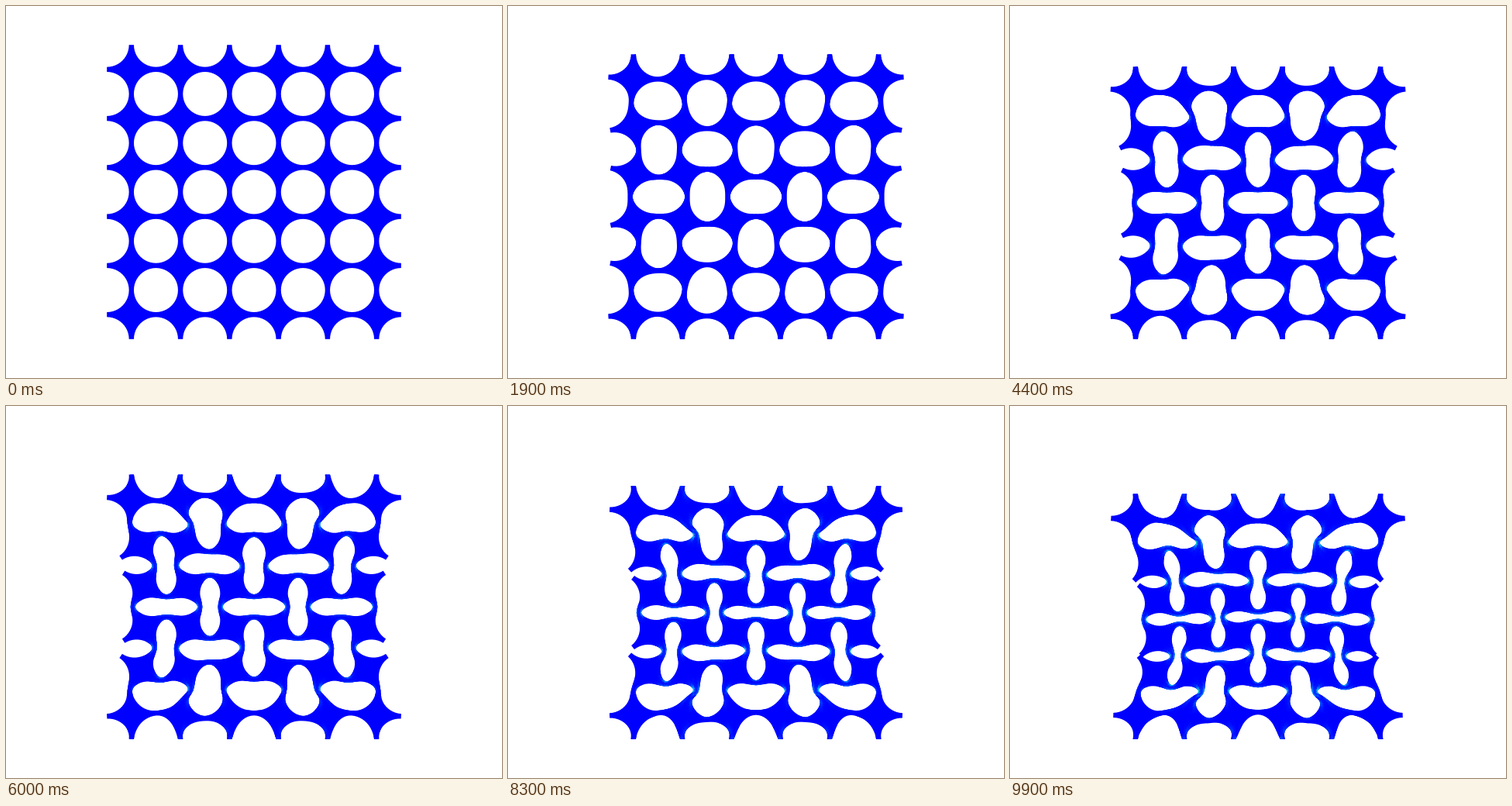
These frames come from a looping animation (640x480 px, 10000 ms). A matplotlib script:

```python
"""Compression of a perforated elastic sheet, solved with finite elements.

One quarter of the 6 x 6 cell sheet is modelled; the rest follows by mirroring.
"""
import numpy as np
import matplotlib.pyplot as plt
from matplotlib.animation import FuncAnimation
from matplotlib.colors import LinearSegmentedColormap
from matplotlib.patches import PathPatch
from matplotlib.path import Path
from matplotlib.tri import Triangulation

W, H, FRAMES = 640, 480, 100
CELL = 63.27            # cell size in pixels
RADIUS = 0.45           # hole radius in cells
SEGS = 3                # elements along each half arm
MU, LAM = 1.0, 1.5      # neo-Hookean constants
TORQUE = 6e-5           # tiny twist that picks the buckling pattern


# ---- mesh of one star-shaped cell ----
def arm_patch():
    s = np.linspace(0, 1, 2 * SEGS + 1)[:, None]
    r = np.linspace(0, 1, 3)
    phi = np.pi * (s - 3) / 4
    x = 0.5 + RADIUS * np.cos(phi)
    y = 0.5 + RADIUS * np.sin(phi)
    base = x - x[0] * (1 - s)
    return np.stack([base + (x - base) * r, y * r], -1)


def merge(points):
    flat = np.round(points.reshape(-1, 2), 6) + 0.0
    nodes, inv = np.unique(flat, axis=0, return_inverse=True)
    return nodes, inv.reshape(points.shape[:-1])


def cell_mesh():
    patch, images = arm_patch(), []
    for k in range(4):
        c, s = [(1, 0), (0, 1), (-1, 0), (0, -1)][k]
        for m in (-1, 1):
            x, y = patch[..., 0], m * patch[..., 1]
            images.append(np.stack([c * x - s * y, s * x + c * y], -1))
    nodes, ids = merge(np.array(images))
    elems = np.array([p[2 * e:2 * e + 3].ravel() for p in ids for e in range(SEGS)])
    loop = []
    for low, high in zip(ids[::2], ids[1::2]):
        loop += [*low[:, 2], low[-1, 1], low[-1, 0], high[-1, 1], *high[:0:-1, 2]]
    return nodes, elems, np.array(loop)


X, EL, LOOP = cell_mesh()
ND = 2 * len(X)
CENTRES = np.array([(i - 2.5, j + 0.5) for j in range(3) for i in range(3)])
NC = len(CENTRES)
XG, GID = merge(CENTRES[:, None] + X)
REF = XG[GID]

# ---- nine-node element operators at 3 x 3 Gauss points ----
gp = np.sqrt(0.6) * np.array([-1, 0, 1])
gw = np.array([5, 8, 5]) / 9
shape = np.stack([gp * (gp - 1) / 2, 1 - gp**2, gp * (gp + 1) / 2], 1)
slope = np.stack([gp - 0.5, -2 * gp, gp + 0.5], 1)
dn = np.stack([np.kron(slope, shape), np.kron(shape, slope)], -1)
jac = np.einsum('gap,eai->egpi', dn, X[EL])
GRAD = np.einsum('egip,gap->egai', np.linalg.inv(jac), dn)
VOL = np.abs(np.linalg.det(jac)) * np.outer(gw, gw).ravel()
NE = len(EL)
B = np.einsum('egaj,ik->egijak', GRAD, np.eye(2)).reshape(NE, 9, 4, 18)
BT = B.reshape(NE, 36, 18).transpose(0, 2, 1)

DOF = (2 * EL[:, :, None] + np.arange(2)).reshape(NE, 18)
cell_no = np.arange(NC)
F_IDX = (cell_no[:, None, None] * ND + DOF).ravel()
K_IDX = (cell_no[:, None, None, None] * ND**2
         + DOF[:, :, None] * ND + DOF[:, None, :]).ravel()
SHARE = np.bincount(EL.ravel(), minlength=len(X))


def dofs(nodes):
    return (2 * nodes[..., None] + np.arange(2)).reshape(*nodes.shape[:-1], -1)


on_port = np.abs(X).max(1) > 0.5 - 1e-5
PORT, INNER = dofs(np.flatnonzero(on_port)), dofs(np.flatnonzero(~on_port))
CELL_DOF = dofs(GID)
PORT_G, INNER_G = CELL_DOF[:, PORT], CELL_DOF[:, INNER]

fixed = np.stack([(XG[:, 0] > -1e-5) | (XG[:, 1] > 3 - 1e-5),
                  (XG[:, 1] < 1e-5) | (XG[:, 1] > 3 - 1e-5)], 1).ravel()
port_dofs = np.unique(PORT_G)
FREE = port_dofs[~fixed[port_dofs]]
PORT_POS = np.searchsorted(port_dofs, PORT_G)
FREE_POS = np.searchsorted(port_dofs, FREE)

spin = -(-1.0) ** (np.arange(NC) // 3 + np.arange(NC) % 3)
twist = np.stack([-X[:, 1], X[:, 0]], 1).ravel() / (X**2).sum()
LOAD = TORQUE * spin[:, None] * twist


def kinematics(u):
    f = np.eye(2) + np.einsum('egaj,ceai->cegij', GRAD, u[GID][:, EL])
    a, b, c, d = f[..., 0, 0], f[..., 0, 1], f[..., 1, 0], f[..., 1, 1]
    det = np.maximum(a * d - b * c, 0.03)
    fit = np.stack([d, -c, -b, a], -1).reshape(f.shape) / det[..., None, None]
    return f, fit, np.log(det)


def energy(u):
    f, _, ln = kinematics(u)
    w = MU / 2 * ((f**2).sum((-1, -2)) - 2 - 2 * ln) + LAM / 2 * ln**2
    return np.array([np.bincount(EL.ravel(), v.ravel(), len(X)) for v in w]) / SHARE


def assemble(u):
    f, t, ln = kinematics(u)
    ln = ln[..., None, None]
    stress = MU * (f - t) + LAM * ln * t
    tv = t.reshape(NC, NE, 9, 4)
    cross = np.einsum('cegil,cegkj->cegijkl', t, t).reshape(NC, NE, 9, 4, 4)
    tang = (MU * np.eye(4) + (MU - LAM * ln) * cross
            + LAM * tv[..., :, None] * tv[..., None, :])
    db = (tang * VOL[..., None, None]) @ B
    k = BT @ db.reshape(NC, NE, 36, 18)
    force = BT @ (stress * VOL[..., None, None]).reshape(NC, NE, 36, 1)
    kk = np.bincount(K_IDX, k.ravel(), NC * ND**2).reshape(NC, ND, ND)
    ff = np.bincount(F_IDX, force.ravel(), NC * ND).reshape(NC, ND)
    return kk, ff - LOAD


def newton_step(u):
    """Condense each cell to its four arm ends, solve, and expand again."""
    k, r = assemble(u)
    k_i, k_p = k[:, INNER], k[:, PORT]
    rhs = np.concatenate([k_i[:, :, PORT], r[:, INNER, None]], 2)
    sol = np.linalg.solve(k_i[:, :, INNER], rhs)
    red = np.concatenate([k_p[:, :, PORT], r[:, PORT, None]], 2) - k_p[:, :, INNER] @ sol

    n = len(port_dofs)
    big, res = np.zeros((n, n)), np.zeros(n)
    np.add.at(big, (PORT_POS[:, :, None], PORT_POS[:, None, :]), red[..., :-1])
    np.add.at(res, PORT_POS, red[..., -1])
    du = np.zeros(XG.size)
    du[FREE] = np.linalg.solve(big[np.ix_(FREE_POS, FREE_POS)], -res[FREE_POS])
    ports = du[PORT_G][..., None]
    du[INNER_G] = -sol[..., -1] - (sol[..., :-1] @ ports)[..., 0]
    return du.reshape(-1, 2)


def solve(steps):
    u = np.zeros_like(XG)
    rate = np.stack([0 * XG[:, 0], -XG[:, 1] / 6], 1)
    shapes, energies = [u[GID]], [energy(u)]
    for a, b in zip(steps[:-1], steps[1:]):
        d = (b - a) / (FRAMES - 1)
        start = u
        u = u + rate * d
        for _ in range(14):
            du = newton_step(u)
            size = np.abs(du).max()
            u = u + du * min(1, 0.05 / size)
            if size < 1e-5:
                break
        rate = (u - start) / d
        shapes.append(u[GID])
        energies.append(energy(u))
    return np.array(shapes), np.array(energies)


# small steps around the onset of buckling, larger ones after it
STEPS = np.r_[0:24, 24:FRAMES:3]
SHAPES, ENERGIES = solve(STEPS)
MIRRORS = [(1, 1), (-1, 1), (1, -1), (-1, -1)]


def mirrored(q):
    return np.concatenate([q * m for m in MIRRORS])


REF_ALL = mirrored(REF)


def state(k):
    n = min(np.searchsorted(STEPS, k, 'right') - 1, len(STEPS) - 2)
    f = (k - STEPS[n]) / (STEPS[n + 1] - STEPS[n])
    u = SHAPES[n] * (1 - f) + SHAPES[n + 1] * f
    e = ENERGIES[n] * (1 - f) + ENERGIES[n + 1] * f
    pos = mirrored(REF + u) * (CELL, -CELL)
    pos += (W / 2, H / 2 + CELL * k / (FRAMES - 1) / 2)
    # late sway: the sides sag downwards
    sway = np.clip((k - 85) / 14, 0, 1)
    x, y = REF_ALL[..., 0] / 3, REF_ALL[..., 1] / 3
    pos[..., 0] += 3 * sway * x * np.sin(np.pi * y)
    pos[..., 1] += 5 * sway * np.abs(x) * np.cos(np.pi * y / 2) ** 2
    return pos, np.tile(e, (4, 1)).ravel()


CODES = np.tile([Path.MOVETO] + [Path.LINETO] * (len(LOOP) - 1) + [Path.CLOSEPOLY],
                4 * NC)


def outline(pos):
    parts = []
    for q, (sx, sy) in enumerate(MIRRORS):
        order = LOOP if sx * sy > 0 else LOOP[::-1]
        parts.append(pos[q * NC:(q + 1) * NC][:, np.r_[order, order[0]]])
    return Path(np.concatenate(parts).reshape(-1, 2), CODES)


def triangles():
    grid = EL.reshape(NE, 3, 3)
    a, b = grid[:, :-1, :-1].ravel(), grid[:, 1:, :-1].ravel()
    c, d = grid[:, 1:, 1:].ravel(), grid[:, :-1, 1:].ravel()
    one = np.concatenate([np.stack([a, b, c], 1), np.stack([a, c, d], 1)])
    shift = np.arange(4 * NC)[:, None, None] * len(X)
    return (one + shift).reshape(-1, 3)


fig = plt.figure(figsize=(W / 100, H / 100), dpi=100, facecolor='white')
ax = fig.add_axes([0, 0, 1, 1])
ax.axis('off')

rainbow = LinearSegmentedColormap.from_list(
    'rainbow_blue', ['#0000ff', '#00ffff', '#00ff00', '#ffff00', '#ff0000'])
vmax = ENERGIES[-1].max() / 0.35
pos0, e0 = state(0)
body = ax.add_patch(PathPatch(outline(pos0), fc='#0000ff', lw=0))
tri = Triangulation(*pos0.reshape(-1, 2).T.copy(), triangles())
glow = ax.tripcolor(tri, e0, shading='gouraud', cmap=rainbow, vmin=0, vmax=vmax)
ax.set_xlim(0, W)
ax.set_ylim(H, 0)


def draw(k):
    pos, e = state(k)
    edge = outline(pos)
    body.set_path(edge)
    tri.x, tri.y = pos.reshape(-1, 2).T.copy()
    hot = e[tri.triangles].max(1) > 0.006 * vmax
    glow.set_visible(bool(hot.any()))
    tri.set_mask(~hot)
    glow.set_array(e)
    glow.set_clip_path(edge, ax.transData)
    return body, glow


anim = FuncAnimation(fig, draw, frames=FRAMES, interval=100,
                     repeat=True, repeat_delay=0, blit=False)
plt.show()
```
